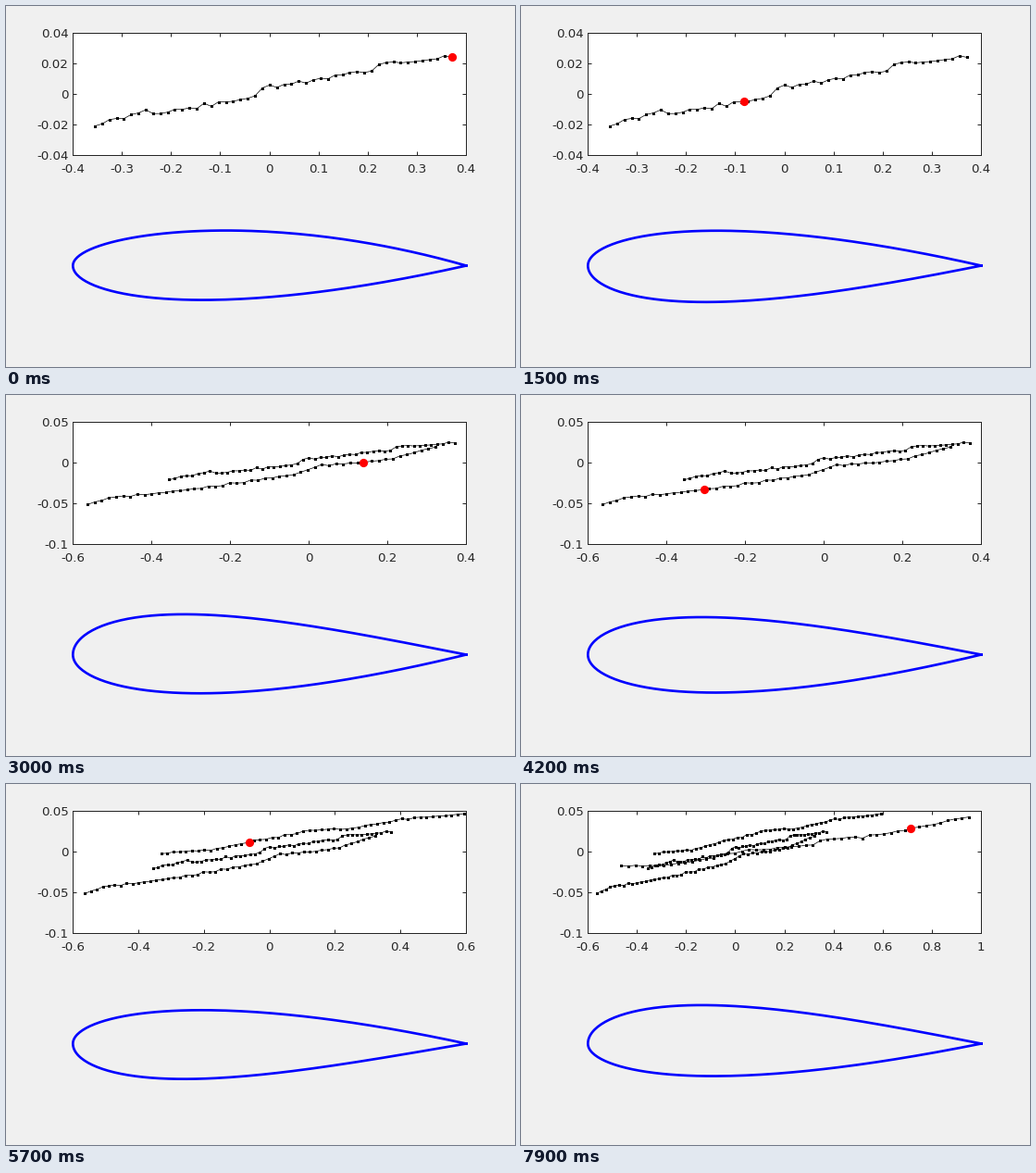
Animation of 550 by 390 pixels, one loop 8000 ms. Source, as a matplotlib script:

```python
import numpy as np
import matplotlib.pyplot as plt
from matplotlib.animation import FuncAnimation
from matplotlib.ticker import FormatStrFormatter

W, H, DPI = 550, 390, 100
FRAMES, STEPS, SAMPLES = 80, 25, 50
LEFT, RIGHT, TOP, BOTTOM = 72, 497, 29, 161  # plot box in pixels
MID = 280.5                                  # chord line of the wing
INK = "#262626"
PX = 72 / DPI                                # points per pixel

plt.rcParams.update({
    "font.family": "DejaVu Sans",
    "font.size": 13.33 * PX,
    "axes.unicode_minus": False,
})

rng = np.random.default_rng(4)
INDEX = np.arange(SAMPLES)
CHORD = (1 - np.cos(np.linspace(0, np.pi, 120))) / 2
sweeps = []


def add_sweep(x_range, falling, trend, start, end):
    """Noisy curve through (sample, value * 1000) points, and the wing's
    (upper nose, upper tail, lower nose, lower tail) at both ends in time."""
    at, value = zip(*trend)
    noise = rng.normal(0, 0.7, SAMPLES)
    noise[[0, -1]] = 0
    sweeps.append(dict(
        x=np.linspace(*x_range, SAMPLES),
        y=(np.interp(INDEX, at, value) + noise) / 1000,
        falling=falling, start=np.array(start), end=np.array(end)))


add_sweep((-0.355, 0.371), True,
          [(0, -21), (7, -10.5), (9, -13), (22, -1.5), (23, 4), (38, 15.5),
           (39, 19.5), (49, 24)],
          (86, 121, 97, 95), (107, 81, 118, 79))
add_sweep((-0.562, 0.3225), True,
          [(0, -51.5), (3, -43), (11, -37), (24, -21.5), (29, -13.5),
           (33, -4), (43, 5), (49, 19)],
          (131, 84, 112, 104), (109, 82, 108, 100))
add_sweep((-0.33, 0.593), False,
          [(0, -2.5), (9, 3), (16, 14.5), (25, 26), (31, 28), (37, 38),
           (49, 46.5)],
          (96, 81, 114, 65), (93, 118, 103, 93))
add_sweep((-0.463, 0.951), True,
          [(0, -17.5), (6, -17), (13, -8), (16, 0), (27, 7.5), (28, 14),
           (36, 20), (49, 42.5)],
          (120, 83, 94, 85), (114, 88, 94, 85))


def side(nose, tail):
    """Round-nosed, sharp-tailed height along the chord."""
    return np.sqrt(CHORD) * (1 - CHORD) * (nose + (tail - nose) * CHORD)


def wing(shape):
    x = LEFT + 0.3 + (RIGHT - LEFT) * CHORD
    upper, lower = MID - side(*shape[:2]), MID + side(*shape[2:])
    return np.r_[x[::-1], x[1:]], np.r_[upper[::-1], lower[1:]]


def fit_axis(axis, values, steps):
    """Round the limits outwards to whole ticks; wide data gets wide ticks."""
    step = steps[np.ptp(values) > 8 * steps[0] or np.ptp(values) > 0.06 > steps[1]]
    lo, hi = np.floor(values.min() / step), np.ceil(values.max() / step)
    axis.set_ticks(np.arange(lo, hi + 1) * step)
    axis.set_view_interval(lo * step, hi * step, ignore=True)


fig = plt.figure(figsize=(W / DPI, H / DPI), dpi=DPI, facecolor="#f0f0f0")

stage = fig.add_axes([0, 0, 1, 1])
stage.set_xlim(0, W)
stage.set_ylim(H, 0)
stage.axis("off")
outline, = stage.plot([], [], color="blue", lw=2.67 * PX)

ax = fig.add_axes([LEFT / W, 1 - BOTTOM / H,
                   (RIGHT - LEFT) / W, (BOTTOM - TOP) / H])
ax.tick_params(direction="in", top=True, right=True, length=4.3 * PX,
               width=PX, color=INK, labelcolor=INK)
ax.tick_params(axis="x", pad=9.4 * PX)
ax.tick_params(axis="y", pad=4.5 * PX)
for spine in ax.spines.values():
    spine.set(color=INK, linewidth=PX)
for axis in (ax.xaxis, ax.yaxis):
    axis.set_major_formatter(FormatStrFormatter("%g"))

curves = [ax.plot(s["x"], s["y"], "k-s", lw=0.7 * PX, ms=3 * PX, mew=0,
                  clip_on=False)[0] for s in sweeps]
dot, = ax.plot([], [], "o", color="red", ms=9.2 * PX, mew=0,
               clip_on=False, zorder=5)


def draw(frame):
    n, step = divmod(frame, STEPS)
    s, k = sweeps[n], step / (STEPS - 1)
    for i, curve in enumerate(curves):
        curve.set_visible(i <= n)
    shown = sweeps[:n + 1]
    fit_axis(ax.xaxis, np.concatenate([c["x"] for c in shown]), (0.1, 0.2))
    fit_axis(ax.yaxis, np.concatenate([c["y"] for c in shown]), (0.02, 0.05))

    pos = (SAMPLES - 1) * (1 - k if s["falling"] else k)
    dot.set_data([np.interp(pos, INDEX, s["x"])],
                 [np.interp(pos, INDEX, s["y"])])
    outline.set_data(*wing(s["start"] + k * (s["end"] - s["start"])))
    return [outline, dot, *curves]


anim = FuncAnimation(fig, draw, frames=FRAMES, interval=100,
                     repeat=True, repeat_delay=0, blit=False)
plt.show()
```
